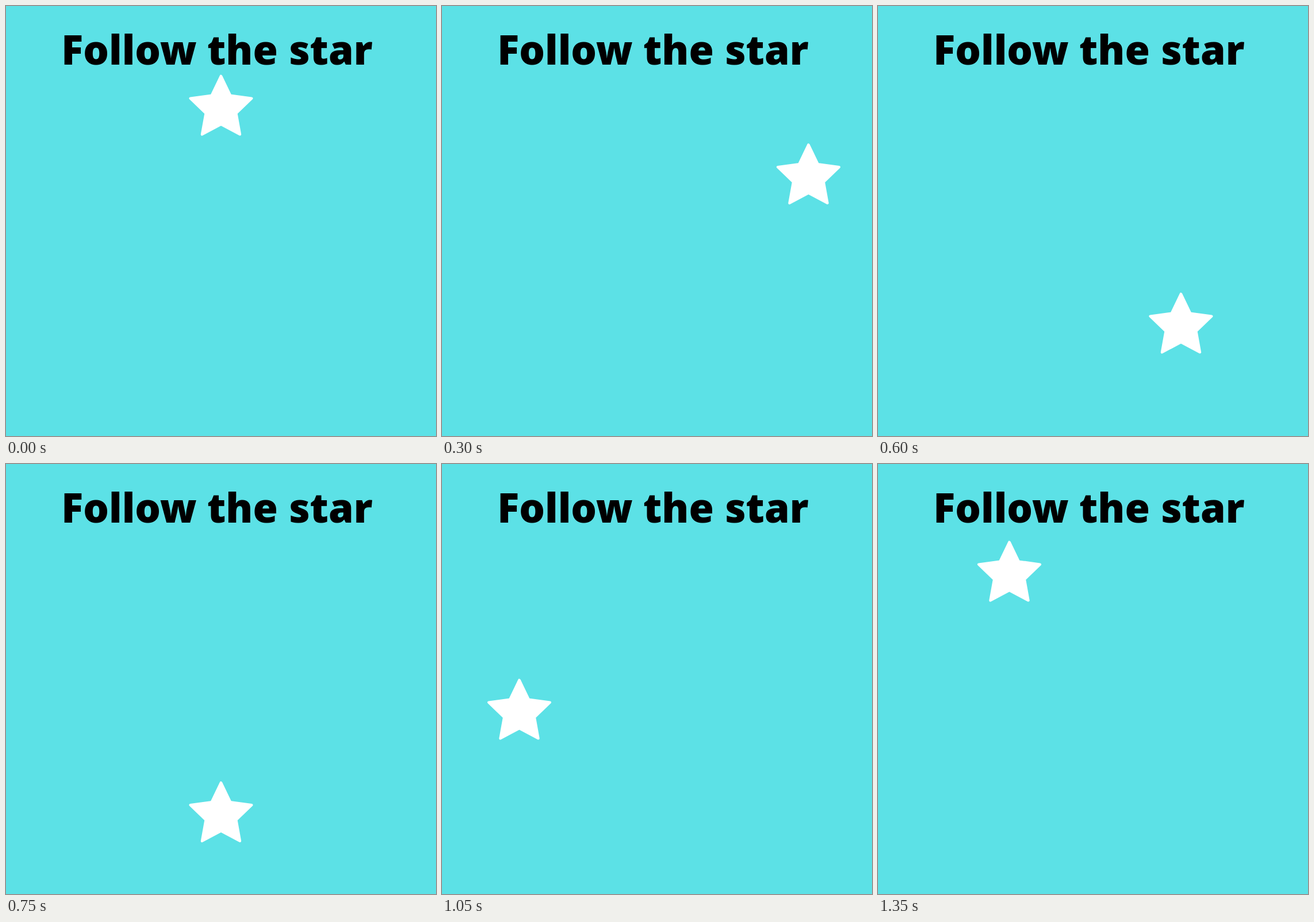
These frames come from a looping animation (748 px wide and 748 px high, 1.5 s). An HTML page:

```html
<!DOCTYPE html>
<html lang="en">
<head>
<meta charset="utf-8">
<title>Follow the star</title>
<style>
  html, body { margin: 0; height: 100%; overflow: hidden; background: #5ce1e6; }
  svg { display: block; width: 100%; height: 100%; }
  text { font: 800 70.3px "Open Sans", "Noto Sans", sans-serif; text-anchor: middle; }
  #star { fill: #fff; stroke: #fff; stroke-width: 4.6; stroke-linejoin: round; }
</style>
</head>
<body>
<svg viewBox="0 0 748 748">
  <text x="367" y="102">Follow the star</text>
  <polygon id="star"/>
</svg>
<script>
  const STEP = 150, OUTER = 56, INNER = 27.6;
  // Key points of the path: centre of the star, clockwise from the top
  const path = [
    [374, 178], [526.5, 192], [637.5, 297.5], [618, 432], [527, 557],
    [374, 610.5], [206, 557], [134.5, 432], [131, 284], [228.5, 192]
  ];
  const star = document.getElementById("star");
  const start = performance.now();

  // Regular five-pointed star: ten corners, alternately outer and inner
  const corner = (_, i) => {
    const angle = i * Math.PI / 5, r = i % 2 ? INNER : OUTER;
    return [r * Math.sin(angle), -r * Math.cos(angle)];
  };
  star.setAttribute("points", Array.from({ length: 10 }, corner).join(" "));

  function draw(now) {
    const step = Math.floor(Math.max(0, now - start) / STEP) % path.length;
    star.setAttribute("transform", `translate(${path[step]})`);
    requestAnimationFrame(draw);
  }
  draw(start);
</script>
</body>
</html>
```
